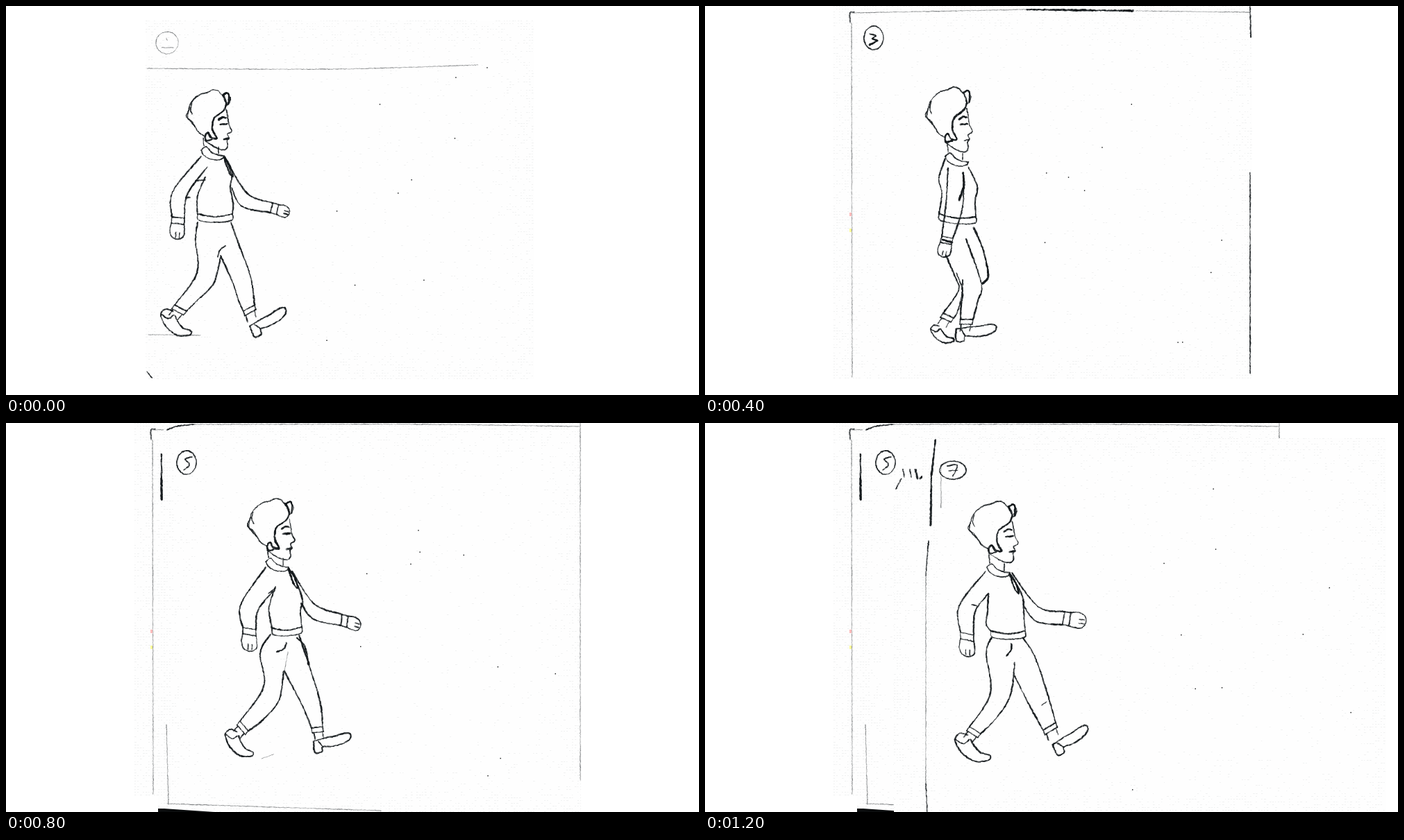
These frames come from a looping animation (998x561 px, 1.4 s). An HTML page with a canvas:

```html
<!DOCTYPE html>
<html lang="en">
<head>
<meta charset="utf-8">
<title>Walk cycle pencil test</title>
<style>
html, body { margin: 0; width: 100%; height: 100%; overflow: hidden; background: #fff; }
canvas { display: block; width: 998px; height: 561px; }
</style>
</head>
<body>
<canvas id="stage" width="998" height="561"></canvas>
<script>
const W = 998, H = 561, HOLD = 200;

let seed = 7;
const rnd = () => (seed = seed * 16807 % 2147483647) / 2147483647;
const parse = s => s.split(' ').map(p => p.split(',').map(Number));
const add = (p, q, k = 1) => [p[0] + q[0] * k, p[1] + q[1] * k];
const sub = (p, q) => add(p, q, -1);
const mix = (p, q, t) => add(p, sub(q, p), t);
const newCanvas = () => Object.assign(document.createElement('canvas'), { width: W, height: H });

// Strokes are "x,y x,y" split by ";". Prefix: b bold, l light, f filled.
const pens = { b: [2.5, .75], l: [.95, .33], n: [1.6, .64], m: [1.95, .68] };

// Templates, in percent of their frame
const hair = '42,78 29,72 20,62 9,52 1,44 6,35 10,24 20,14 33,7 48,4 59,0 71,2 80,9 90,5 94,10 97,15 93,24 88,25;' +
  '6,35 4,47 13,53 20,62;13,22 10,33 14,41;b80,9 90,5 94,10 93,24;' +
  'b81,9 88,22 84,33 74,40 62,47 58,58 59,69 67,81 55,80 48,72 42,78 45,85 57,83';
const face = '88,33 91,44 94,58 100,69 91,74 94,81 90,85 91,94 86,100 72,99 57,93 42,85;' +
  'b72,50 80,46 88,47;b75,58 90,57;b83,83 94,81';
const collar = '0,0 7,-5 15,3 25,7 33,8;0,0 4,7 12,12 23,14 31,12 33,8;3,-18 4,-6;25,-5 25,5';
const tie = 'b33,10 37,23 41,33 46,38 42,24 33,10';
const fist = '0,0 -10,60 10,110 60,122 102,95 106,45 100,0;40,70 40,112;70,70 70,112';
const shoes = {
  rear: '24,-25 4,-19 0,0 17,15 39,24 68,26 86,18 102,3 96,-6 74,-1 54,-7 35,-18;0,0 24,0 32,-16',
  front: '9,-27 0,0 17,6 24,-4 45,5 74,11 95,8 101,-3 88,-11 63,-15 41,-21 9,-27;20,-22 24,-4'
};

const stack = newCanvas(), g = stack.getContext('2d');
g.fillStyle = '#fff';
g.fillRect(0, 0, W, H);
g.lineCap = g.lineJoin = 'round';
const views = [];

// Catmull-Rom value between b and c
const spline = (a, b, c, d, t) =>
  b + t * ((c - a) + t * (2 * a - 5 * b + 4 * c - d + t * (3 * b - a - 3 * c + d))) / 2;

function pencil(pts, [width, alpha]) {
  const phase = rnd() * 6;
  let prev = pts[0], run = 0;
  for (let i = 0; i < pts.length - 1; i++) {
    const b = pts[i], c = pts[i + 1], a = pts[i - 1] || b, d = pts[i + 2] || c;
    const n = Math.max(1, Math.ceil(Math.hypot(...sub(c, b)) / 2));
    for (let k = 1; k <= n; k++) {
      const next = [0, 1].map(j => spline(a[j], b[j], c[j], d[j], k / n) + (rnd() - .5) * .7);
      g.lineWidth = width * (.75 + rnd() * .5 + .2 * Math.sin(phase + run++ / 7));
      g.globalAlpha = Math.min(1, alpha * (.7 + rnd() * .7));
      g.beginPath();
      g.moveTo(...prev);
      g.lineTo(...next);
      g.stroke();
      prev = next;
    }
  }
  g.globalAlpha = 1;
}

function strokes(text, place = p => p, pen = 'n') {
  for (const s of text.split(';')) {
    const pts = parse(s.replace(/^[a-z]/, '')).map(place);
    if (s[0] === 'f') {
      g.beginPath();
      pts.forEach(p => g.lineTo(...p));
      g.fill();
    } else pencil(pts, pens[s[0]] || pens[pen]);
  }
}

function ring([cx, cy, rx, ry], pen) {
  pencil(Array.from({ length: 15 }, (_, i) => {
    const a = i * Math.PI / 7 - 2;
    return [cx + rx * Math.cos(a), cy + ry * Math.sin(a)];
  }), pens[pen]);
}

function head([x0, y0, x1, y1]) {
  const place = ([u, v]) => [x0 + (x1 - x0) * u / 100, y0 + (y1 - y0) * v / 100];
  strokes(hair, place);
  strokes(face, place);
}

// Two outlines of a limb; gives their ends and the way they point
function limb(text, pen) {
  strokes(text, undefined, pen);
  const [p, q] = text.split(';').map(parse);
  const a = p.at(-1), b = q.at(-1);
  const dir = add(sub(a, p.at(-2)), sub(b, q.at(-2)));
  const len = Math.hypot(...dir);
  return { a, b, dir: dir.map(v => v / len) };
}

function cuff({ a, b, dir }, size, pen = 'n') {
  const c = add(a, dir, size), d = add(b, dir, size);
  pencil([a, b], pens[pen]);
  pencil([a, c, c, d, d, b], pens[pen]);
  return { a: c, b: d, dir };
}

function arm(text) {
  const { a, b, dir } = cuff(limb(text, 'm'), 9);
  const size = Math.hypot(...sub(b, a));
  strokes(fist, ([u, v]) => add(mix(a, b, u / 100), dir, size * v / 100), 'n');
}

function leg(text) {
  const { a, b, dir } = cuff(limb(text, 'm'), 7);
  for (const t of [.12, .88]) {
    const p = mix(a, b, t);
    pencil([p, add(p, dir, 10)], pens.n);
  }
}

function shoe(kind, text) {
  const [heel, toe] = parse(text), d = sub(toe, heel);
  strokes(shoes[kind], ([u, v]) => add(add(heel, d, u / 100), [-d[1], d[0]], v / 100), 'm');
}

function torso(text) {
  const { a, b } = limb(text, 'm');
  const sag = add(mix(a, b, .5), [0, 4]);
  pencil([a, sag, b], pens.m);
  pencil([a, add(a, [2, 9]), add(sag, [0, 8]), add(b, [-1, 9]), b], pens.n);
}

function paper([x0, y0, x1, y1]) {
  g.fillStyle = '#fefefe';
  g.fillRect(x0, y0, x1 - x0, y1 - y0);
  g.fillStyle = 'rgba(60,70,70,.07)';
  for (let y = y0; y < y1; y += 4)
    for (let x = x0; x < x1; x += 4) {
      const edge = Math.min(x - x0, x1 - x, y - y0, y1 - y);
      if (rnd() < .04 + .6 * Math.exp(-edge / 22)) g.fillRect(x, y, 1 + 2 * rnd(), 1);
    }
  g.fillStyle = '#0a0c0d';
  for (let i = 0; i < 10; i++)
    g.fillRect(x0 + (x1 - x0) * (.45 + .5 * rnd()), y0 + (y1 - y0) * (.1 + .85 * rnd()), 1.4, 1.4);
}

// Each new sheet lies on top of the ones before it.
function sheet(s) {
  const [x0, y0, x1, y1] = s.box;
  g.save();
  g.beginPath();
  g.rect(x0, y0, x1 - x0, y1 - y0);
  g.clip();
  paper(s.box);
  g.strokeStyle = '#14191c';
  if (s.ring) ring(s.ring, s.ringPen || 'n');
  strokes(s.marks);
  head(s.head);
  const atNeck = p => add(p, s.neck);
  strokes(collar, atNeck);
  if (s.tie) strokes(tie, atNeck);
  torso(s.torso);
  s.arms.forEach(arm);
  s.legs.forEach(leg);
  shoe('rear', s.rear);
  shoe(s.step || 'front', s.front);
  strokes(s.folds);
  if (s.tints) s.tints.forEach((color, i) => {
    g.fillStyle = color;
    g.fillRect(208, 298 + 23 * i, 3, 5);
  });
  g.restore();
  const view = newCanvas();
  view.getContext('2d').drawImage(stack, 0, 0);
  views.push(view);
}

sheet({
  box: [201, 21, 760, 538], ring: [232, 53, 16, 16], ringPen: 'l',
  marks: 'l231,46 232,50;l224,60 241,60;l203,90 470,91 680,85;l205,474 280,475;203,527 210,536',
  head: [259, 121, 325, 207], neck: [281, 208], tie: true,
  torso: '287,247 277,270 275,285 276,300;315,217 325,245 323,260 327,285 326,300',
  arms: ['281,217 240,268 239,304;290,232 261,272 257,306', '316,219 347,270 384,284;325,262 340,289 381,298'],
  legs: ['276,312 273,338 275,385 243,431;309,362 299,400 275,425 260,440',
    '324,312 335,343 352,390 358,431;309,360 327,400 335,425 342,440'],
  rear: '223,444 266,472', front: '358,477 402,437',
  folds: 'b259,276 265,276;273,252 287,251;305,362 308,352 316,346'
});

sheet({
  box: [185, 0, 788, 538], ring: [219, 14, 13, 15], ringPen: 'l',
  marks: '215,9 220,4 216,18 227,18;l787,290 786,525 775,531',
  head: [267, 102, 337, 193], neck: [296, 198], tie: true,
  torso: '302,240 290,272 297,285 298,296;328,209 343,240 343,270 347,295',
  arms: ['297,203 259,265 258,303;309,236 283,272 277,306', '330,212 360,262 396,269;346,260 358,285 394,287'],
  legs: ['299,307 293,340 300,385 267,443;327,362 320,400 300,432 281,452',
    '341,306 365,335 391,362 391,433;316,356 368,374 367,395 373,434'],
  rear: '244,460 287,485', front: '370,484 435,466',
  folds: 'b333,216 341,234 346,258;314,340 317,356 325,348;366,376 372,362;298,244 313,236'
});

sheet({
  box: [205, 0, 788, 538], ring: [243, 46, 14, 17], tints: ['#fbb', '#ff9'],
  marks: 'b237,40 246,43 241,47 248,50 237,56;209,24 209,10 215,9;l209,10 463,5;b463,5 616,7;l620,7 784,9;' +
    'l211,24 212,535;785,0 786,45;785,240 785,530',
  head: [317, 117, 385, 210], neck: [346, 217],
  torso: '346,220 337,248 341,270 337,300;379,232 392,260 389,280 390,304',
  arms: ['350,234 347,285 341,332;372,240 371,290 357,335'],
  legs: ['347,360 360,390 365,410 343,443;371,395 370,415 364,440 358,450',
    '376,336 398,400 393,425 386,452;362,385 371,410 369,430 368,452'],
  rear: '325,466 358,482', front: '362,483 419,463',
  folds: 'b387,320 400,350 408,388 400,400;b342,337 356,341;b371,240 373,258 366,280'
});

sheet({
  box: [219, 44, 828, 561], ring: [258, 83, 16, 15], ringPen: 'l',
  marks: '250,80 258,61 267,62 265,86;248,78 262,76;b224,44 224,110;820,160 822,300;l814,60 820,160;' +
    'f219,556 560,560 560,561 219,561',
  head: [329, 97, 404, 189], neck: [360, 195],
  torso: '362,196 355,235 357,258 356,276;400,250 403,265 401,281',
  arms: ['397,205 424,242 449,278;381,234 412,267 436,288'],
  legs: ['356,289 349,320 360,365 345,420;390,316 390,370 383,400 368,428',
    '400,292 413,330 435,385 413,428;391,350 410,382 404,405 399,425'],
  rear: '328,455 378,482', front: '382,453 424,472', step: 'rear',
  folds: 'b357,194 337,230 329,250 353,266;358,212 354,240 345,246 356,252;b418,240 427,248 421,256;' +
    '361,263 373,250 361,263;373,314 386,303'
});

sheet({
  box: [227, 0, 828, 561], ring: [260, 57, 14, 17],
  marks: '268,49 258,52 264,60 256,68;232,10 245,5 270,2;l270,2 600,2 826,5;l827,0 827,515;' +
    'l231,435 234,550;l232,549 540,559;f227,556 300,561 227,561',
  head: [347, 109, 416, 197], neck: [374, 200], tie: true,
  torso: '388,236 379,265 381,285 383,296;413,216 427,255 424,270 426,294',
  arms: ['374,208 338,262 341,295;385,242 363,270 360,298', '412,214 444,261 484,276;425,260 443,283 482,292'],
  legs: ['381,305 366,332 371,380 337,430;400,358 393,400 370,428 349,444',
    '422,306 436,348 452,400 456,438;401,358 424,402 433,422 440,440'],
  rear: '316,448 355,478', front: '445,475 496,450',
  folds: 'b390,330 400,326 404,317;b419,310 430,322 436,348;378,246 388,238;l406,330 401,358;l368,484 385,478'
});

sheet({
  box: [272, 66, 981, 561],
  marks: '285,66 287,78;295,66 297,78;b303,67 306,80;b325,68 310,80;275,95 283,80',
  head: [367, 115, 436, 195], neck: [397, 206], tie: true,
  torso: '400,248 396,272 402,288 402,295;430,217 446,255 452,280 449,296',
  arms: ['398,216 362,270 361,300;400,245 384,272 380,304', '430,215 467,260 498,265;447,263 462,283 498,283'],
  legs: ['404,308 400,340 408,393 381,441;433,358 430,402 408,435 391,454',
    '450,310 478,335 500,362 506,425;416,350 474,369 479,400 484,429'],
  rear: '361,461 399,486', front: '487,473 550,457',
  folds: 'b446,314 438,325;470,355 474,369;398,250 413,242'
});

sheet({
  box: [313, 22, 981, 561], ring: [357, 68, 19, 13],
  marks: '349,62 363,61 357,77;351,69 364,68;b332,24 326,76;b326,76 325,148;l340,60 340,122;' +
    '322,170 318,220;l318,220 318,520;318,520 320,561',
  head: [378, 113, 451, 201], neck: [406, 208], tie: true,
  torso: '408,246 407,270 405,290 412,300;441,220 457,250 459,275 461,300',
  arms: ['404,214 366,264 368,302;408,246 389,272 387,306', '442,216 480,265 518,272;458,262 477,286 515,291'],
  legs: ['413,309 405,332 411,390 381,438;446,345 440,392 420,425 397,448',
    '458,310 474,335 490,380 505,432;446,365 466,405 477,425 487,443'],
  rear: '360,456 410,483', front: '508,479 550,438',
  folds: 'b434,336 441,327 441,318;485,407 492,402;384,262 392,264'
});

const ctx = document.getElementById('stage').getContext('2d');
const start = performance.now();
let shown = -1;
function tick() {
  const i = Math.floor((performance.now() - start) / HOLD) % views.length;
  if (i !== shown) ctx.drawImage(views[shown = i], 0, 0);
  requestAnimationFrame(tick);
}
tick();
</script>
</body>
</html>
```
